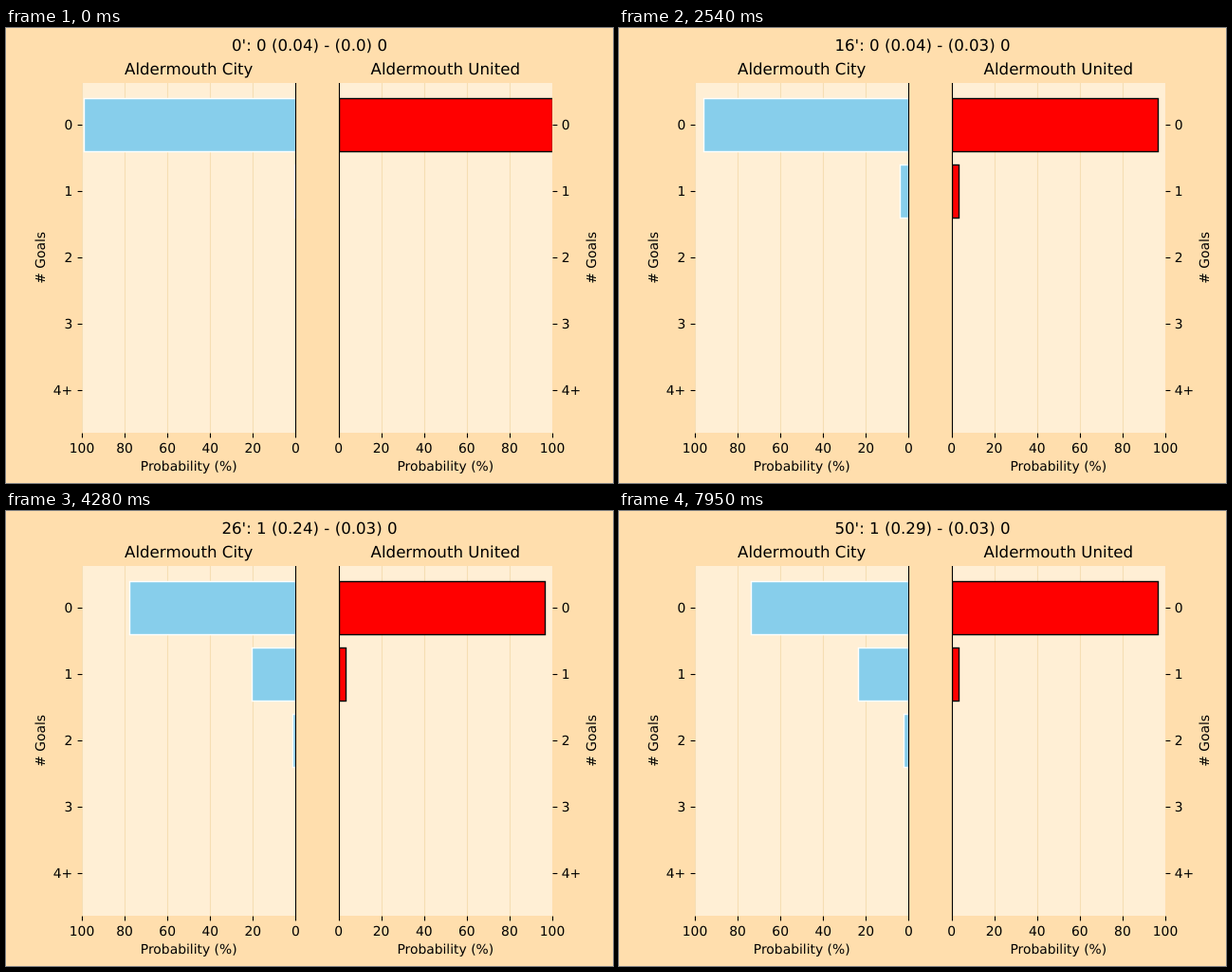
These frames come from a looping animation (640x480 px, 8 s). An HTML page:

```html
<!DOCTYPE html>
<html lang="en">
<head>
<meta charset="utf-8">
<title>Goal probabilities</title>
<style>
  html, body { margin: 0; width: 100%; height: 100%; overflow: hidden; background: #ffdead; }
  svg { display: block; width: 640px; height: 480px; }
  text { font: 13.889px "DejaVu Sans", sans-serif; text-rendering: geometricPrecision; text-anchor: middle; white-space: pre; }
  .big { font-size: 16.667px; }
  .line { stroke: #000; stroke-width: 1.11; }
  .grid { stroke: #f5deb3; stroke-width: 1.11; }
  .bar { stroke-width: 1.389; }
</style>
</head>
<body>
<svg id="stage" viewBox="0 0 640 480"></svg>
<script>
const LOOP = 8000, STEP = 31.85, STEPS = 5, LEAD = 17;
const TOP = 57.6, BOTTOM = 427.2, WIDTH = 225.45, ROW = 70, FIRST = 102.4;
const stage = document.getElementById('stage');
const snap = v => Math.floor(v + 0.5) + 0.5;

function add(parent, tag, attrs, text) {
  const node = document.createElementNS('http://www.w3.org/2000/svg', tag);
  for (const key in attrs) node.setAttribute(key, attrs[key]);
  if (text !== undefined) node.textContent = text;
  parent.append(node);
  return node;
}
const line = (parent, x1, y1, x2, y2, cls = 'line') =>
  add(parent, 'line', { x1, y1, x2, y2, class: cls });

// dir is the way the bars grow: -1 to the left, 1 to the right
const teams = [
  { name: 'Aldermouth City', zero: 305.45, dir: -1, left: 80, fill: '#87ceeb', edge: '#fff',
    shots: [[0, 0.04], [18, 0.0583], [23, 0.141, true], [38, 0.05]] },
  { name: 'Aldermouth United', zero: 350.55, dir: 1, left: 351, fill: '#f00', edge: '#000',
    shots: [[4, 0.034]] }
];

function buildPanel(team, id) {
  const { zero, dir, left } = team;
  const outer = zero + dir * WIDTH, mid = zero + dir * WIDTH / 2;
  const box = { x: left, y: 58, width: 225, height: 369 };
  add(stage, 'rect', { ...box, fill: '#ffefd5' });
  add(add(stage, 'clipPath', { id: 'clip' + id }), 'rect', box);
  const plot = add(stage, 'g', { 'clip-path': `url(#clip${id})` });

  for (let i = 0; i <= 5; i++) {
    const x = zero + dir * WIDTH * i / 5;
    line(plot, snap(x), 58, snap(x), 427, 'grid');
    line(stage, snap(x), 427.5, snap(x), 432.4);
    add(stage, 'text', { x, y: 448 }, i * 20);
  }
  team.bars = [0, 1, 2, 3, 4].map(i => {
    const y = FIRST + i * ROW, edge = snap(outer);
    line(stage, edge, snap(y), edge + dir * 4.9, snap(y));
    add(stage, 'text', {
      x: outer + dir * 9.72, y: Math.round(y + 5),
      style: `text-anchor:${dir < 0 ? 'end' : 'start'}`
    }, i < 4 ? i : '4+');
    return add(plot, 'rect', {
      class: 'bar', y: snap(y - 28), height: 56, fill: team.fill, stroke: team.edge
    });
  });
  line(stage, snap(zero), 58, snap(zero), 428);

  add(stage, 'text', { x: mid, y: 49, class: 'big' }, team.name);
  add(stage, 'text', { x: mid, y: 467 }, 'Probability (%)');
  const labelX = dir < 0 ? 41 : 622;
  add(stage, 'text', { transform: `translate(${labelX} 242.4) rotate(-90)` }, '# Goals');
}

// Chance of 0 to 4+ goals from independent shots
function spread(chances) {
  let odds = [1, 0, 0, 0, 0];
  for (const p of chances)
    odds = odds.map((v, i) => (i < 4 ? v * (1 - p) : v) + (i ? odds[i - 1] * p : 0));
  return odds;
}

function drawBars(team, minute, part) {
  const chances = before => team.shots.filter(s => s[0] < before).map(s => s[1]);
  const from = spread(chances(minute)), to = spread(chances(minute + 1));
  const base = snap(team.zero);
  team.bars.forEach((bar, i) => {
    const value = from[i] + (to[i] - from[i]) * part;
    const tip = snap(team.zero + team.dir * WIDTH * value);
    bar.setAttribute('x', Math.min(base, tip));
    bar.setAttribute('width', Math.abs(tip - base));
  });
}

function score(team, minute) {
  const taken = team.shots.filter(s => s[0] <= minute);
  const sum = Math.round(taken.reduce((a, s) => a + s[1], 0) * 100) / 100;
  return { goals: taken.filter(s => s[2]).length, xg: sum ? String(sum) : '0.0' };
}

teams.forEach(buildPanel);
const heading = add(stage, 'text', { x: 320, y: 24, class: 'big' });

function draw(t) {
  const tick = t < 30 ? 0 : Math.floor((t + LEAD) / STEP);
  const minute = Math.floor(tick / STEPS);
  for (const team of teams) drawBars(team, minute, (tick % STEPS + 1) / STEPS);
  const [home, away] = teams.map(team => score(team, minute));
  heading.textContent = `${minute}': ${home.goals} (${home.xg}) - (${away.xg}) ${away.goals}`;
}

function frame() {
  draw(performance.now() % LOOP);
  requestAnimationFrame(frame);
}
frame();
</script>
</body>
</html>
```
